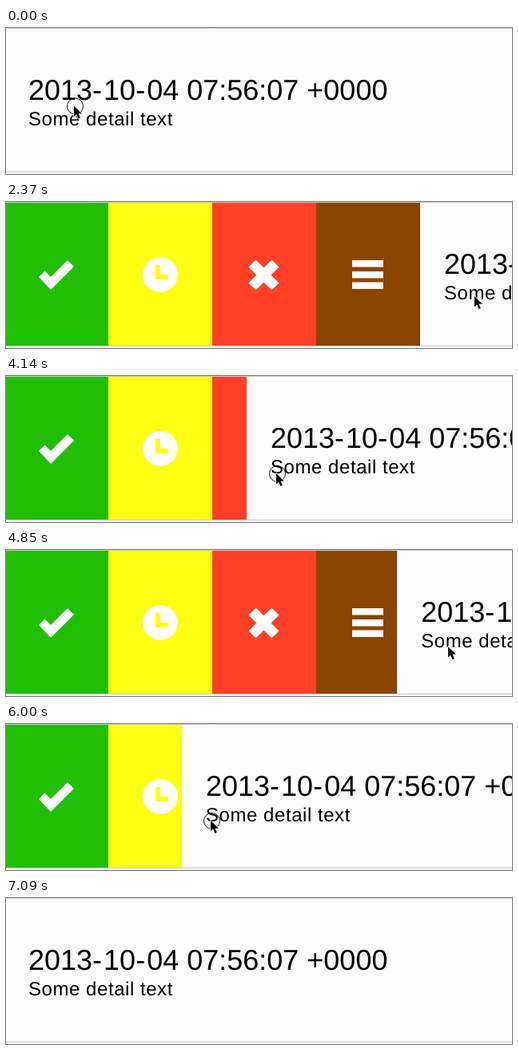
Animation of 633x183 px, one loop 7.65 s. Source, as an HTML page:

```html
<!DOCTYPE html>
<html lang="en">
<head>
<meta charset="utf-8">
<title>Swipeable table cell</title>
<style>
  html, body { margin: 0; width: 100%; height: 100%; overflow: hidden; background: #fdfdfd; }
  svg { display: block; width: 633px; height: 183px; }
  text { font-family: "Liberation Sans", Arial, sans-serif; text-rendering: geometricPrecision; }
  .dash { letter-spacing: 2px; }
</style>
</head>
<body>
<svg viewBox="0 0 633 183">
  <rect width="633" height="183" fill="#fdfdfd"/>
  <rect y="1" width="128" height="179" fill="#20bf05"/>
  <rect x="128" y="1" width="130" height="179" fill="#ffff14"/>
  <rect x="258" y="1" width="130" height="179" fill="#ff3f26"/>
  <rect x="388" y="1" width="130" height="179" fill="#8a4500"/>

  <g fill="#fff">
    <path d="M41 94 48.5 86.5 56 94 77 73 85 81 56 110Z"/>
    <circle cx="193" cy="91" r="22"/>
    <path d="M187 79h6v12h10v6h-16z" fill="#ffff14"/>
    <g transform="translate(322.5 91.5) rotate(45)">
      <rect x="-20.5" y="-6.5" width="41" height="13"/>
      <rect x="-6.5" y="-20.5" width="13" height="41"/>
    </g>
    <path d="M433 73h39v8.5h-39zM433 87h39v8.5h-39zM433 100.5h39v8.5h-39z"/>
  </g>

  <g id="cell">
    <rect y="1" width="640" height="179" fill="#fdfdfd"/>
    <text x="30" y="90" font-size="36">2013<tspan class="dash">-</tspan>10<tspan class="dash">-</tspan>04 07:56:07 +0000</text>
    <text x="30" y="122" font-size="24" letter-spacing=".55">Some detail text</text>
  </g>
  <path d="M0 .5H633M0 180.5H633" stroke="#c8c7cc"/>

  <g id="pointer">
    <circle id="press" cx="1.5" cy=".5" r="10" fill="none" stroke="#111"/>
    <path d="M0 0V13.5L3.1 10.6 5.4 16 7.8 15 5.5 9.7H9.8Z" fill="#000"
      stroke="#fff" stroke-width="1.6" paint-order="stroke" stroke-linejoin="round"/>
  </g>
</svg>
<script>
const LOOP = 7650, GONE = 7090;
const [cell, pointer, press] = ["cell", "pointer", "press"].map(id => document.getElementById(id));

const smooth = p => p * p * (3 - 2 * p);
const easeOut = p => 1 - (1 - p) ** 2;

// A value that rests between moves
const move = (begin, end, to, ease = smooth) => ({ begin, end, to, ease });
const track = (first, ...moves) => t => moves.reduce((v, m) => {
  const p = Math.min(1, Math.max(0, (t - m.begin) / (m.end - m.begin)));
  return v + (m.to - v) * m.ease(p);
}, first);

const cellX = track(-2,
  move(900, 1616, 518),            // swipe open
  move(3030, 4140, 301, easeOut),  // drag partly back
  move(4280, 5020, 518),           // let go, snap open
  move(5290, 5905, 220, easeOut),  // drag past half
  move(6060, 6730, -2));           // let go, snap shut

const tipX = track(85,
  move(900, 1386, 438, easeOut),
  move(1690, 2370, 586),
  move(3030, 4140, 338, easeOut),
  move(4280, 5020, 586),
  move(5290, 5874, 256, easeOut),
  move(6060, 6500, 253),
  move(6830, GONE, 552));

const tipY = track(97.5,
  move(1690, 2370, 118),
  move(3030, 4140, 122),
  move(4280, 5020, 121),
  move(6830, GONE, 185));

const presses = [[0, 30], [900, 1230], [3030, 4280], [5290, 6060]];

function draw(t) {
  cell.setAttribute("transform", `translate(${cellX(t)} 0)`);
  pointer.setAttribute("transform", `translate(${tipX(t)} ${tipY(t)})`);
  pointer.style.display = t < GONE ? "" : "none";
  press.style.display = presses.some(([a, b]) => t >= a && t < b) ? "" : "none";
}

const start = performance.now();
function tick() {
  draw((performance.now() - start) % LOOP);
  requestAnimationFrame(tick);
}
tick();
</script>
</body>
</html>
```
